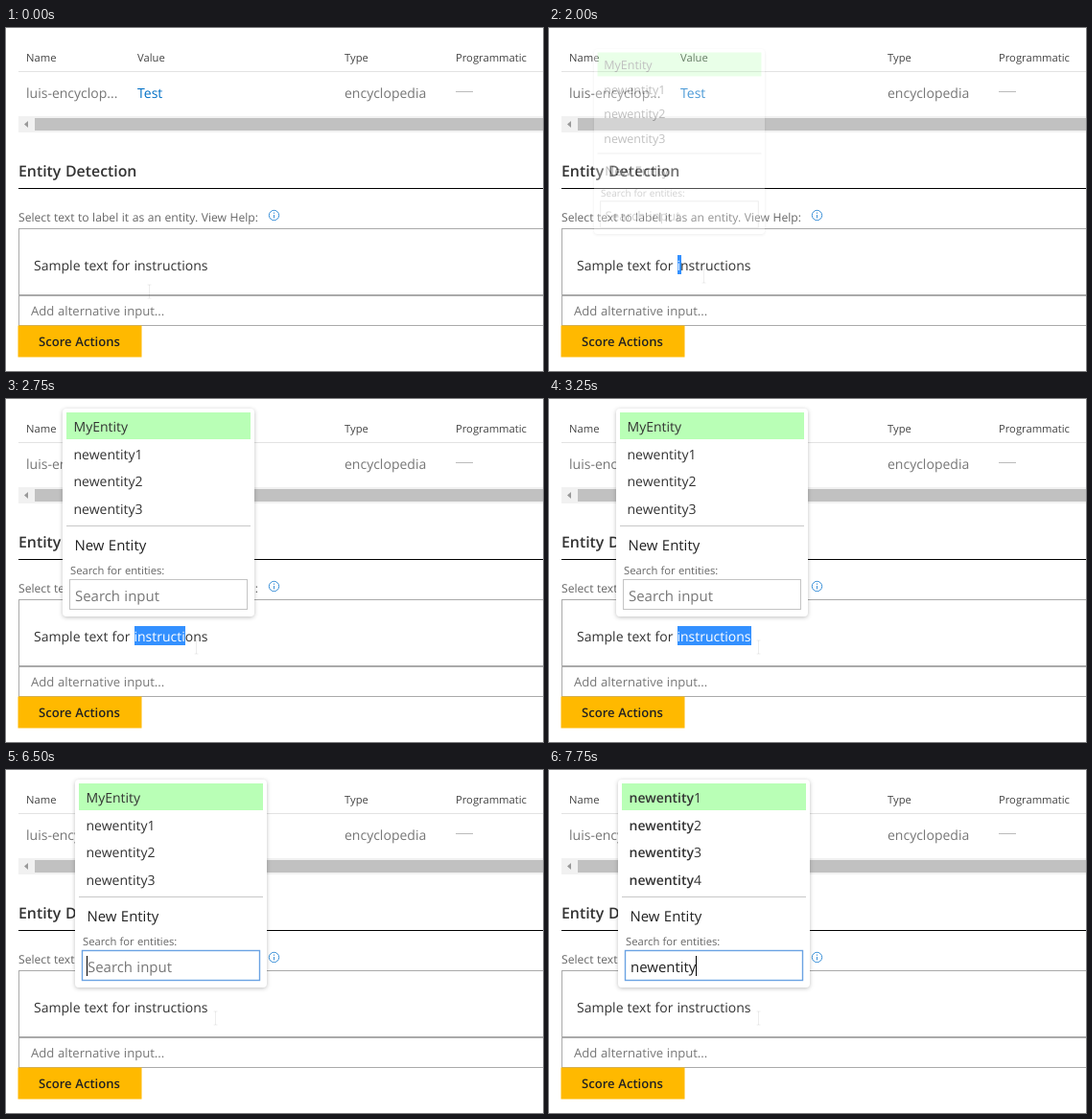
These frames come from a looping animation (560x358 px, 8 s). An HTML page:

```html
<!DOCTYPE html>
<html lang="en">
<head>
<meta charset="utf-8">
<title>Entity labelling</title>
<style>
html, body { margin: 0; width: 100%; height: 100%; overflow: hidden; background: #fff; }
svg { display: block; }
text { font-family: "Open Sans", "Noto Sans", sans-serif; word-spacing: .03em; text-rendering: geometricPrecision; white-space: pre; }
#card { filter: drop-shadow(0 1px 2px rgba(0,0,0,.25)); }
</style>
</head>
<body>
<svg id="stage" width="560" height="358" viewBox="0 0 560 358"></svg>
<script>
const LOOP = 8000, TICK = 250;
const FONT_SCALE = 0.935;
const WORD = 'instructions', WORD_START = 16;
const QUERY = 'newentity';

const text = (x, y, size, fill, str, extra = '') =>
  `<text x="${x}" y="${y}" font-size="${size * FONT_SCALE}" fill="${fill}" ${extra}>${str}</text>`;
const rect = (x, y, w, h, fill, extra = '') =>
  `<rect x="${x}" y="${y}" width="${w}" height="${h}" fill="${fill}" ${extra}/>`;
const semibold = 'font-weight="600"';
const sample = (fill, extra) => text(29, 253, 15, fill, 'Sample text for ' + WORD, extra);

const columns = [
  [21, 'Name', 'luis-encyclop...', '#777'],
  [137, 'Value', 'Test', '#0070c6'],
  [353, 'Type', 'encyclopedia', '#777'],
  [469, 'Programmatic', '', '#777']
].map(([x, head, cell, fill]) => text(x, 35, 12, '#444', head) + text(x, 73, 15, fill, cell)).join('');

const page = columns +
  rect(469, 66, 18, 1, '#bbb') +
  rect(13, 45, 547, 1, '#e2e2e2') +
  rect(13, 92, 547, 17, '#f1f1f1') + rect(30, 94, 530, 13, '#c1c1c1') +
  '<path d="M23 97v7l-4-3.5z" fill="#999"/>' +
  text(13, 155, 17, '#333', 'Entity Detection', semibold) +
  rect(13, 167, 547, 1, '#000') +
  text(13, 202, 13, '#666', 'Select text to label it as an entity. View Help:') +
  '<circle cx="279.5" cy="195.5" r="5.2" fill="none" stroke="#3a90d8"/>' +
  rect(279, 192.5, 1, 1.3, '#3a90d8') + rect(279, 195, 1, 3.5, '#3a90d8') +
  rect(13.5, 209.5, 560, 69, '#fff', 'stroke="#aaa"') +
  rect(13.5, 279.5, 560, 31, '#fff', 'stroke="#aaa"') +
  sample('#333', 'id="sample"') +
  text(26, 300, 14, '#777', 'Add alternative input...') +
  rect(12.5, 310.5, 129, 33, '#ffb900') +
  text(34, 332, 14, '#222', 'Score Actions', semibold);

const rows = Array.from({ length: 4 }, (_, i) =>
  text(11.5, Math.round(34 + 28.6 * i), 15, '#333', '', 'class="row"')).join('');

const popup =
  rect(0, 10, 200, 217, '#fff', 'id="card" rx="4"') +
  rect(4, 14, 192, 28, '#b9ffb6') + rows +
  rect(4, 132, 192, 1, '#c8c8c8') +
  text(12.5, 158, 16, '#222', 'New Entity') +
  text(8, 183, 12, '#666', 'Search for entities:') +
  rect(7.5, 188.5, 185, 31, '#fff', 'id="field"') +
  text(13, 211, 16, '#777', '', 'id="query"') +
  rect(12, 194, 1, 21, '#000', 'id="queryCaret"');

document.getElementById('stage').innerHTML =
  `<clipPath id="clip">${rect(134, 237, 0, 20, '#000', 'id="clipBox"')}</clipPath>` + page +
  `<g clip-path="url(#clip)">${rect(134, 237, 80, 20, '#3390ff')}${sample('#fff')}</g>` +
  rect(134, 238, 1, 19, '#000', 'id="caret"') +
  `<g id="popup">${popup}</g>` +
  '<path id="pointer" d="M-2 -7h4M0 -7v14M-2 7h4" fill="none" stroke="#000" stroke-opacity=".07"/>';

const el = id => document.getElementById(id);
const rowEls = [...document.querySelectorAll('.row')];
const set = (node, attrs) => { for (const k in attrs) node.setAttribute(k, attrs[k]); };

const progress = (t, from, to) => Math.min(1, Math.max(0, (t - from) / (to - from)));
const ease = u => Math.sin(u * Math.PI / 2) ** 1.3;

// Key points of the pointer: time, x, y.
const pointerPath = [[0, 149, 275], [500, 163, 254], [1250, 145, 258],
  [1750, 145, 258], [2250, 177, 259], [3250, 218, 259]];

function pointerAt(t) {
  const next = pointerPath.findIndex(p => p[0] > t);
  if (next < 0) return pointerPath.at(-1).slice(1);
  const a = pointerPath[next - 1], b = pointerPath[next];
  const u = progress(t, a[0], b[0]);
  return [1, 2].map(i => Math.round(a[i] + (b[i] - a[i]) * u));
}

function draw(t) {
  const dragging = t >= 2000 && t < 4250;
  const focused = t >= 4250;
  const typing = t >= 6750;

  const [px, py] = pointerAt(t);
  set(el('pointer'), { transform: `translate(${px + .5} ${py})` });
  set(el('caret'), { opacity: +(t >= 1750 && !dragging && !focused) });

  // The selection grows by whole letters.
  const letters = Math.max(1, Math.round(WORD.length * ease(progress(t, 2000, 3250))));
  set(el('clipBox'), { width: dragging ? Math.round(el('sample').getSubStringLength(WORD_START, letters)) : 0 });

  // The popup enters smaller and translucent, then follows the selection.
  const left = 36 + Math.round(36 * ease(progress(t, 2000, 3500)));
  const entering = t < 2250;
  const zoom = entering ? ' translate(100 118.5) scale(.89) translate(-100 -118.5)' : '';
  set(el('popup'), {
    transform: `translate(${left} 0)` + zoom,
    opacity: t < 2000 ? 0 : entering ? .3 : 1
  });

  // Typing speeds up towards the end.
  const typed = typing ? 2 + Math.floor(7 * progress(t, 6750, 7750) ** 2) : 0;
  const query = QUERY.slice(0, typed);
  const queryEl = el('query');
  queryEl.textContent = query || 'Search input';
  set(queryEl, { fill: typing ? '#222' : '#777' });
  set(el('field'), { stroke: focused ? '#6ba3e3' : '#c4c4c4', 'stroke-width': focused ? 1.4 : 1 });

  const blinkOn = Math.floor((t - 4220) / 530) % 2 === 0;
  set(el('queryCaret'), {
    x: typing ? Math.round(13 + queryEl.getComputedTextLength()) : 12,
    opacity: +(typing || focused && blinkOn)
  });

  rowEls.forEach((row, i) => {
    row.innerHTML = typing ? `<tspan ${semibold}>${query}</tspan>${QUERY.slice(typed)}${i + 1}`
      : i ? QUERY + i : 'MyEntity';
  });
}

const start = performance.now();
function tick() {
  const t = (performance.now() - start) % LOOP;
  draw(Math.floor(t / TICK) * TICK);
  requestAnimationFrame(tick);
}
tick();
</script>
</body>
</html>
```
